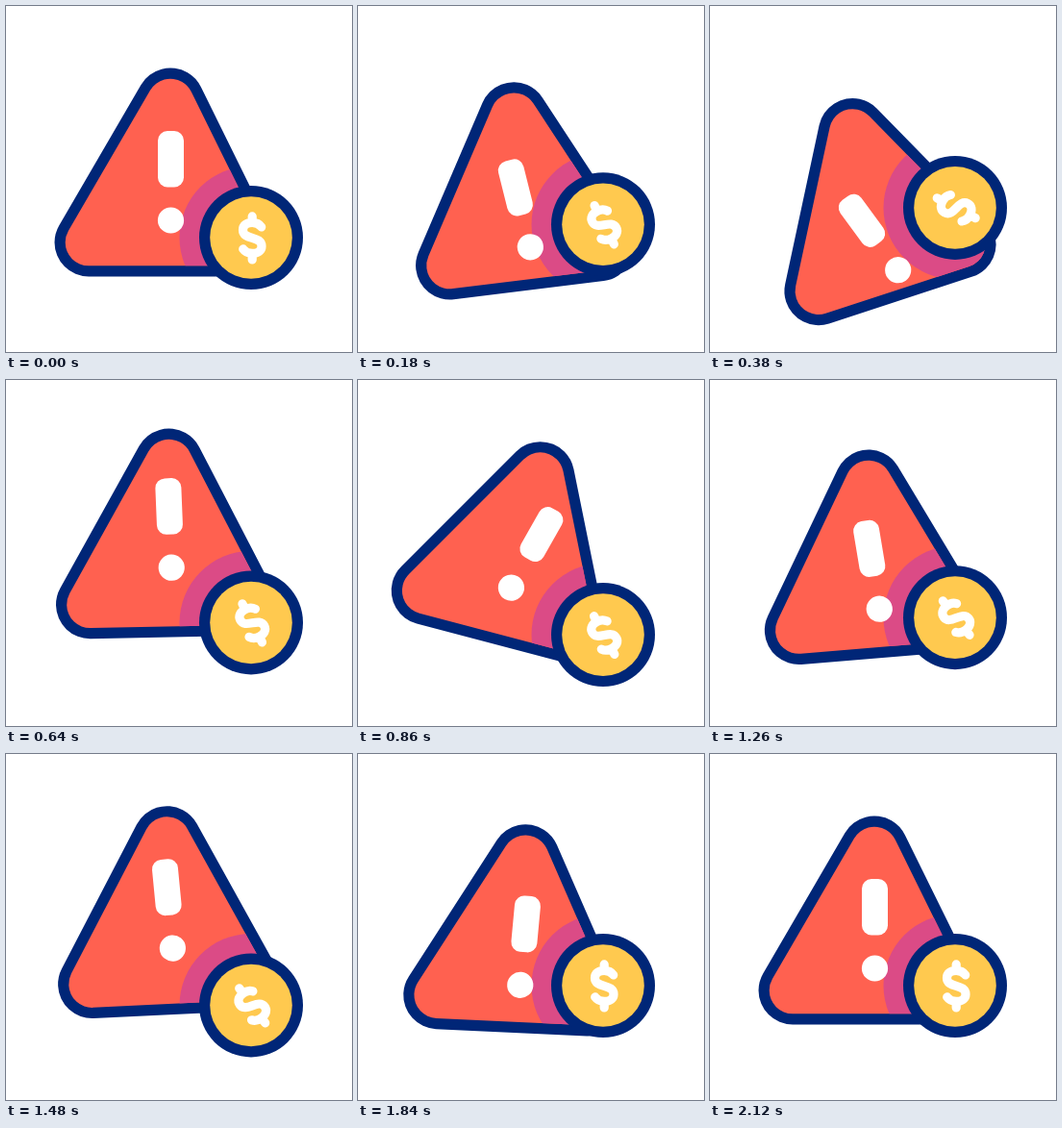
An HTML page with a canvas for the animation above (2400 ms loop, 360 by 360 pixels).

```html
<!DOCTYPE html>
<html lang="en">
<head>
<meta charset="utf-8">
<title>Money warning</title>
<style>
  html, body { margin: 0; width: 100%; height: 100%; overflow: hidden; background: #fff; }
  canvas { display: block; width: 360px; height: 360px; }
</style>
</head>
<body>
<canvas id="stage"></canvas>
<script>
const SIZE = 360, LOOP = 2400, STEP = 20;
const NAVY = '#002677', RED = '#ff6150', PINK = '#db4b86', GOLD = '#ffc94f', WHITE = '#fff';

const canvas = document.getElementById('stage');
const ctx = canvas.getContext('2d');
const dpr = window.devicePixelRatio || 1;
canvas.width = canvas.height = SIZE * dpr;

// Motion tracks: [time in ms, value], degrees or pixels
const signDrop = [[0, 0], [360, 28.3], [720, -20], [1080, 31.3], [1420, -12], [1780, 9.5], [2120, 0]];
const signTilt = [[0, 0], [437, -19], [830, 15], [1320, -5.6], [1740, 3.2], [2120, 0]];
const coinDrop = [[0, 0], [392, -31.2], [783, 30], [1110, -12], [1400, 22.5], [1830, 0]];
const coinSpin = [[0, 0], [400, -63], [700, -23], [1100, -38], [1440, -38], [1830, 0]];

// Centres of the sign's rounded corners, clockwise from the apex
const corners = [[171, 100], [243, 246], [86, 246]];
const pivot = [171, 173];
const dot = [171.5, 223];
const coin = [255, 241];

function track(keys, t) {
  for (let i = 1; i < keys.length; i++) {
    const [t0, a] = keys[i - 1], [t1, b] = keys[i];
    if (t < t1) {
      const p = (t - t0) / (t1 - t0);
      return a + (b - a) * p * p * (3 - 2 * p);
    }
  }
  return keys[keys.length - 1][1];
}

function turn([x, y], drop, deg) {
  ctx.translate(x, y + drop);
  ctx.rotate(deg * Math.PI / 180);
  ctx.translate(-x, -y);
}

function disc([x, y], r, color) {
  ctx.beginPath();
  ctx.arc(x, y, r, 0, Math.PI * 2);
  ctx.fillStyle = color;
  ctx.fill();
}

function signPath(r) {
  const normal = (a, b) => Math.atan2(b[1] - a[1], b[0] - a[0]) - Math.PI / 2;
  ctx.beginPath();
  corners.forEach((c, i) => {
    const prev = corners[(i + 2) % 3], next = corners[(i + 1) % 3];
    ctx.arc(c[0], c[1], r, normal(prev, c), normal(c, next));
  });
  ctx.closePath();
}

function drawSign(drop, tilt, halo) {
  ctx.save();
  turn(pivot, drop, tilt);
  signPath(35.5);
  ctx.fillStyle = NAVY;
  ctx.fill();
  signPath(24.3);
  ctx.fillStyle = RED;
  ctx.fill();
  ctx.restore();

  // Pink halo of the coin, kept inside the sign
  ctx.save();
  ctx.save();
  turn(pivot, drop, tilt);
  signPath(24.3);
  ctx.restore();
  ctx.clip();
  disc(halo, 74.5, PINK);
  ctx.restore();

  // The mark swings once more within the sign
  ctx.save();
  turn(pivot, drop, tilt);
  turn(dot, drop, tilt);
  disc(dot, 13.6, WHITE);
  ctx.beginPath();
  ctx.roundRect(158, 130, 27, 58.5, 10);
  ctx.fill();
  ctx.restore();
}

function drawCoin(center, spin) {
  disc(center, 54, NAVY);
  disc(center, 42.8, GOLD);
  ctx.save();
  ctx.translate(center[0] + 1.2, center[1] + 0.4);
  ctx.rotate(spin * Math.PI / 180);
  ctx.beginPath();
  ctx.moveTo(0, -22.5);
  ctx.lineTo(0, -16);
  ctx.moveTo(9.5, -11.5);
  ctx.bezierCurveTo(7, -15, 4, -16, 0, -16);
  ctx.bezierCurveTo(-6, -16, -9.7, -13, -9.7, -8.5);
  ctx.bezierCurveTo(-9.7, -3, -5, -1.5, 0, 0);
  ctx.bezierCurveTo(5, 1.5, 9.8, 3, 9.8, 8.5);
  ctx.bezierCurveTo(9.8, 13, 6, 16, 0, 16);
  ctx.bezierCurveTo(-4, 16, -7, 15, -9.5, 11.5);
  ctx.moveTo(0, 16);
  ctx.lineTo(0, 22.5);
  ctx.strokeStyle = WHITE;
  ctx.lineWidth = 9.2;
  ctx.lineCap = ctx.lineJoin = 'round';
  ctx.stroke();
  ctx.restore();
}

function draw(now) {
  const t = Math.floor((now % LOOP) / STEP) * STEP;
  const center = [coin[0], coin[1] + track(coinDrop, t)];
  ctx.setTransform(dpr, 0, 0, dpr, 0, 0);
  ctx.fillStyle = WHITE;
  ctx.fillRect(0, 0, SIZE, SIZE);
  drawSign(track(signDrop, t), track(signTilt, t), center);
  drawCoin(center, track(coinSpin, t));
}

const start = performance.now();
function tick() {
  draw(performance.now() - start);
  requestAnimationFrame(tick);
}
tick();
</script>
</body>
</html>
```
